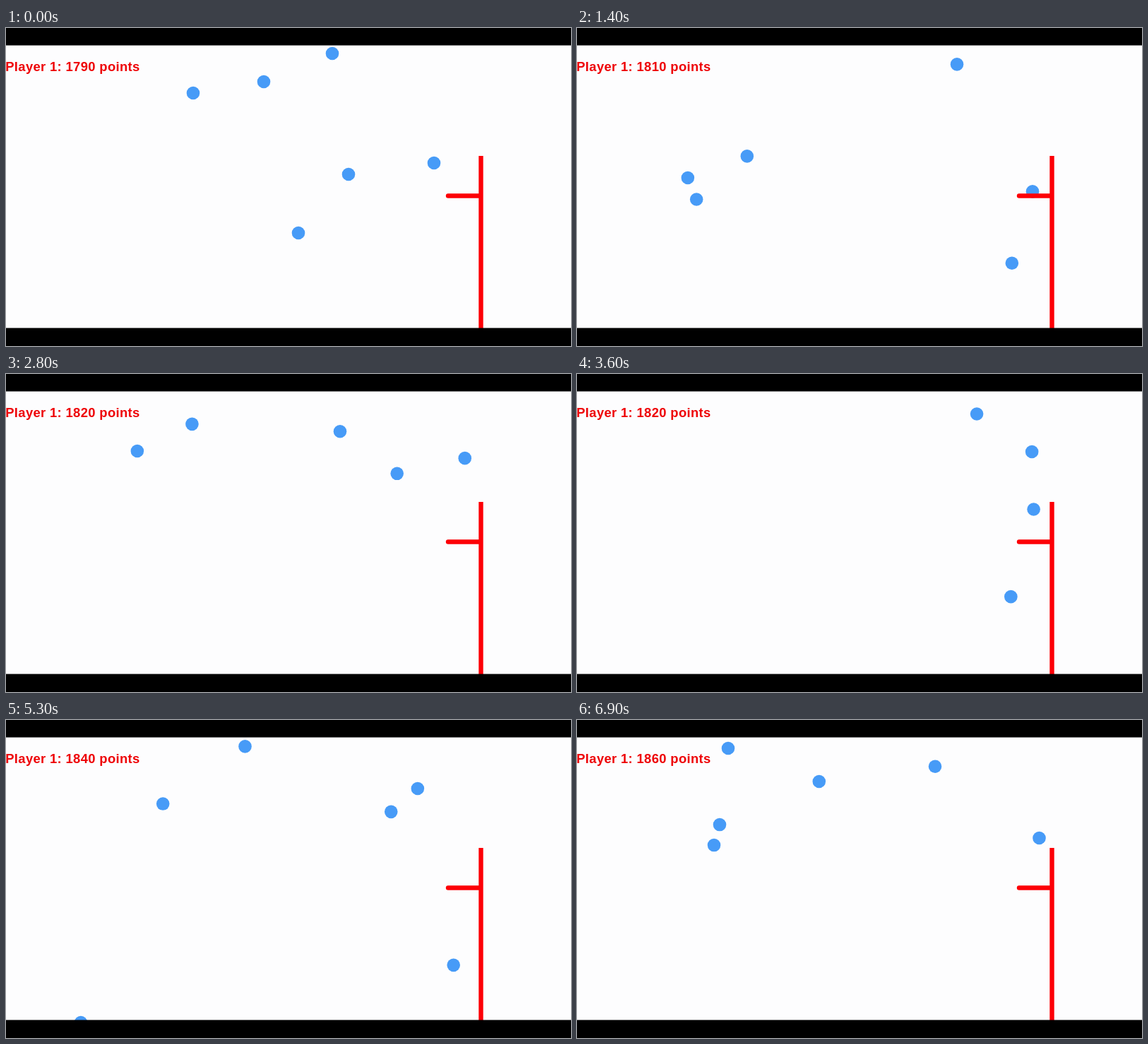
Animation, 800 px wide and 450 px high, one loop 7000 ms. Source, as an HTML page:

```html
<!DOCTYPE html>
<html lang="en">
<head>
<meta charset="utf-8">
<title>Hoop game</title>
<style>
  html, body { margin: 0; width: 100%; height: 100%; overflow: hidden; background: #000; }
  svg { display: block; width: 100vw; height: 100vh; }
  text {
    font: bold 18.4px "Liberation Sans", Arial, sans-serif;
    letter-spacing: 0.35px; fill: #ee0206; text-anchor: middle;
  }
</style>
</head>
<body>
<svg viewBox="0 0 800 450">
  <rect width="800" height="450" fill="#fdfdfe"/>
  <text id="score" x="94.4" y="61.2"></text>
  <g id="balls" fill="#479bf7"></g>
  <path d="M672.5 181V425" stroke="#fd0006" stroke-width="6.4"/>
  <path d="M626 237.5H671" stroke="#fd0006" stroke-width="6.4" stroke-linecap="round"/>
  <rect width="800" height="24.6"/>
  <rect y="424.5" width="800" height="25.5"/>
</svg>
<script>
// Units: pixels and seconds.
const LOOP = 7, STEP = 0.1;
const GRAVITY = 230;
const BOARD = 660;      // ball centre when it touches the board
const FRICTION = 15;    // downward speed lost on the board
const HAND = { x: 62, y: 407 };

// One free flight; "bounce" is the share of speed kept at the board.
const fly = (from, x, y, vx, vy, { until = LOOP, bounce = 0.6 } = {}) =>
  ({ from, x, y, vx, vy, until, bounce });
const toss = (from, vx, vy, options) => fly(from, HAND.x, HAND.y, vx, vy, options);

const flights = [
  // in the air when the loop begins
  fly(0, 265, 92, 195, -190, { until: 2.19 }),
  fly(0, 365, 76, 200, -50, { bounce: 0.94 }),
  fly(0, 462, 36, 194, 55),
  fly(0, 485, 207, -185, 108),
  fly(0, 414, 290, -180, 220),
  fly(0, 606, 191, -81, 183),
  // thrown from the hand
  toss(0.6, 223.5, -374, { bounce: 0.63 }),
  toss(0.89, 186, -441, { until: 4.1 }),
  toss(0.906, 217, -389.8),
  toss(1.69, 181.5, -430.5, { bounce: 0.46 }),
  toss(2.02, 158.8, -471.7),
  toss(3.9, 197.5, -425),
  toss(3.9, 31.4, -146),
  toss(4.4, 178, -424),
  toss(5.46, 195, -387.8),
  toss(5.9, 152, -482),
  toss(6.16, 189.2, -435),
  toss(6.2, 188.6, -409),
  // two hops on the rim, and one off the top of the board
  fly(2.19, 654, 225, -7, -243.7, { until: 4.31 }),
  fly(4.31, 639, 225, 104, -198, { bounce: 1.4 }),
  fly(4.1, 660, 176, 320, 60, { bounce: -1 })
];

const goals = [1, 1.3, 2.2, 3.8, 4.4, 5.8, 6.2];
const scoreText = document.getElementById("score");
const layer = document.getElementById("balls");

for (const flight of flights) {
  flight.node = document.createElementNS("http://www.w3.org/2000/svg", "circle");
  flight.node.setAttribute("r", 9.3);
  layer.append(flight.node);
}

function position({ from, x, y, vx, vy, bounce }, t) {
  const age = t - from;
  let px = x + vx * age;
  let py = y + vy * age + GRAVITY / 2 * age * age;
  const beyond = px - BOARD;
  if (beyond > 0) {
    px = BOARD - beyond * bounce;
    py -= FRICTION * beyond / vx;
  }
  return [px, py];
}

function draw(t) {
  for (const flight of flights) {
    const [x, y] = position(flight, t);
    const shown = t >= flight.from && t < flight.until && y < 440;
    flight.node.setAttribute("visibility", shown ? "visible" : "hidden");
    flight.node.setAttribute("cx", x.toFixed(2));
    flight.node.setAttribute("cy", y.toFixed(2));
  }
  const points = 1790 + 10 * goals.filter(g => t >= g).length;
  scoreText.textContent = `Player 1: ${points} points`;
}

const start = performance.now();
function tick() {
  const t = (performance.now() - start) / 1000 % LOOP;
  draw(Math.floor(t / STEP + 1e-6) * STEP);
  requestAnimationFrame(tick);
}
tick();
</script>
</body>
</html>
```
